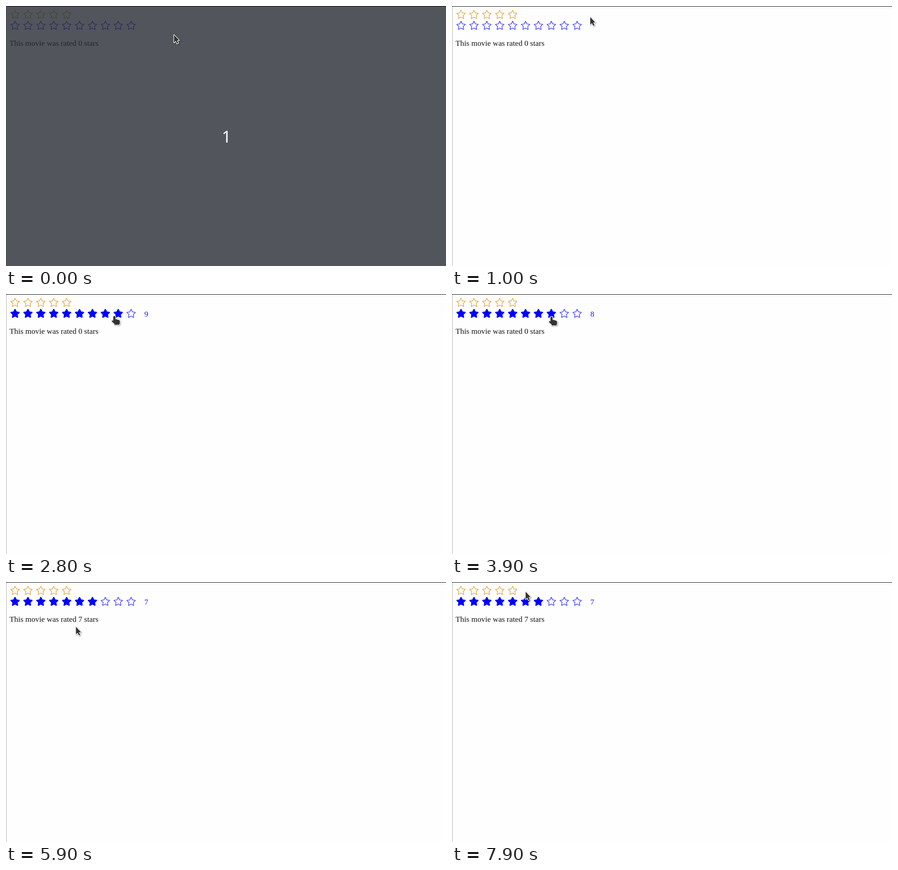
An HTML page for the animation above (8000 ms loop, 974 by 575 pixels).

```html
<!DOCTYPE html>
<html lang="en">
<head>
<meta charset="utf-8">
<title>Star rating</title>
<style>
  html, body { margin: 0; width: 100%; height: 100%; overflow: hidden; background: #fefefe; }
  svg { display: block; width: 974px; height: 575px; }
  .text { font: 17.25px "Liberation Serif", Tinos, serif; fill: #111; }
  #score { fill: #1414ff; }
  #count { font: 36px "Noto Sans", "Open Sans", sans-serif; fill: #fff; text-anchor: middle; }
  .star { stroke-linejoin: round; }
  #cursor { filter: drop-shadow(1px 1.5px 1.2px rgba(0, 0, 0, .4)); }
  #cursor path { fill: #333; stroke: #fff; stroke-width: 2.4; stroke-linejoin: round; paint-order: stroke; }
</style>
</head>
<body>
<svg viewBox="0 0 974 575">
  <rect width="974" height="575" fill="#fefefe"/>
  <rect width="1" height="575" fill="#aaa"/>
  <g id="stars"></g>
  <text id="score" class="text" x="306.3" y="49.6"></text>
  <text id="label" class="text" x="7.8" y="87.6"></text>
  <g id="overlay">
    <rect width="974" height="575" fill="#272b33" fill-opacity=".8"/>
    <text id="count" x="488" y="301.5">1</text>
  </g>
  <rect width="974" height="1" fill="#000"/>
  <g id="cursor">
    <path id="arrow" d="M1 1.5V18.3L4.8 14.7L7.5 20.8L10.3 19.5L7.7 13.6H12.2Z"/>
    <path id="hand" d="M-2.6 2Q-2.6 0 -.2 0Q2.2 0 2.2 2V7.3Q4.6 6.7 5.8 8.1Q8.2 7.8 9.2 9.1Q12 9.1 12 11.6V15Q12 17 11 18V19.4H0V17.5L-5.6 12.5Q-6.6 10.3 -4.6 9.9Q-3.4 9.9 -2.6 11Z"/>
  </g>
</svg>
<script>
const LOOP = 8000, STEP = 100;
const FIRST_X = 20, PITCH = 28.55, GOLD_Y = 19.4, BLUE_Y = 43.7;
const CLICK = 4900, RATING = 7;
const $ = id => document.getElementById(id);

// Pointer moves: start, end, x, y; it rests between them.
const home = { x: 371, y: 62.5 };
const moves = [
  [500, 1000, 305, 23], [1000, 1600, 273, 42.5], [2500, 2800, 240, 48.5],
  [2900, 3400, 222, 50], [3850, 4200, 195, 49.7], [5500, 6000, 149, 103],
  [6300, 6700, 169, 28.3], [6700, 7000, 165, 17.5], [7500, 7900, 162, 20]
];

const clamp = k => Math.min(1, Math.max(0, k));
const ease = k => k * k * (3 - 2 * k);

function pointerAt(t) {
  return moves.reduce((p, [start, end, x, y]) => {
    const k = ease(clamp((t - start) / (end - start)));
    return { x: p.x + (x - p.x) * k, y: p.y + (y - p.y) * k };
  }, home);
}

// Number of the blue star under the pointer, 0 in the gaps and outside the row.
function hovered({ x, y }) {
  const pos = (x - FIRST_X) / PITCH, i = Math.round(pos);
  const inside = i >= 0 && i < 10 && Math.abs(pos - i) < 0.45 && y > 28 && y < 54;
  return inside ? i + 1 : 0;
}

function starPoints(cx, cy, outer, inner) {
  return Array.from({ length: 10 }, (_, i) => {
    const r = i % 2 ? inner : outer, a = (i / 5 - 0.5) * Math.PI;
    return (cx + r * Math.cos(a)).toFixed(2) + "," + (cy + r * Math.sin(a)).toFixed(2);
  }).join(" ");
}

function addRow(count, cy) {
  return Array.from({ length: count }, (_, i) => {
    const el = document.createElementNS("http://www.w3.org/2000/svg", "polygon");
    el.setAttribute("class", "star");
    $("stars").append(el);
    return { el, cx: FIRST_X + PITCH * i, cy };
  });
}

function paint({ el, cx, cy }, color, filled) {
  const [outer, inner] = filled ? [9.3, 4.6] : [10.1, 5.1];
  el.setAttribute("points", starPoints(cx, cy, outer, inner));
  el.setAttribute("fill", filled ? color : "none");
  el.setAttribute("stroke", color);
  el.setAttribute("stroke-width", filled ? 2.8 : 1.4);
}

addRow(5, GOLD_Y).forEach(s => paint(s, "#d9ab3c", false));
const blue = addRow(10, BLUE_Y);

function draw(t) {
  const p = pointerAt(t), over = hovered(p);
  const rated = t < CLICK ? 0 : RATING, n = over || rated;
  blue.forEach((s, i) => paint(s, i < n ? "#00f" : "#3c3cff", i < n));
  $("score").textContent = n || "";
  $("label").textContent = `This movie was rated ${rated} stars`;
  $("overlay").style.display = t < STEP ? "" : "none";
  $("cursor").setAttribute("transform", `translate(${p.x.toFixed(1)} ${p.y.toFixed(1)})`);
  $("arrow").style.display = over ? "none" : "";
  $("hand").style.display = over ? "" : "none";
}

let last = -1;
function tick() {
  const t = Math.floor(performance.now() % LOOP / STEP) * STEP;
  if (t !== last) draw(last = t);
  requestAnimationFrame(tick);
}
tick();
</script>
</body>
</html>
```
